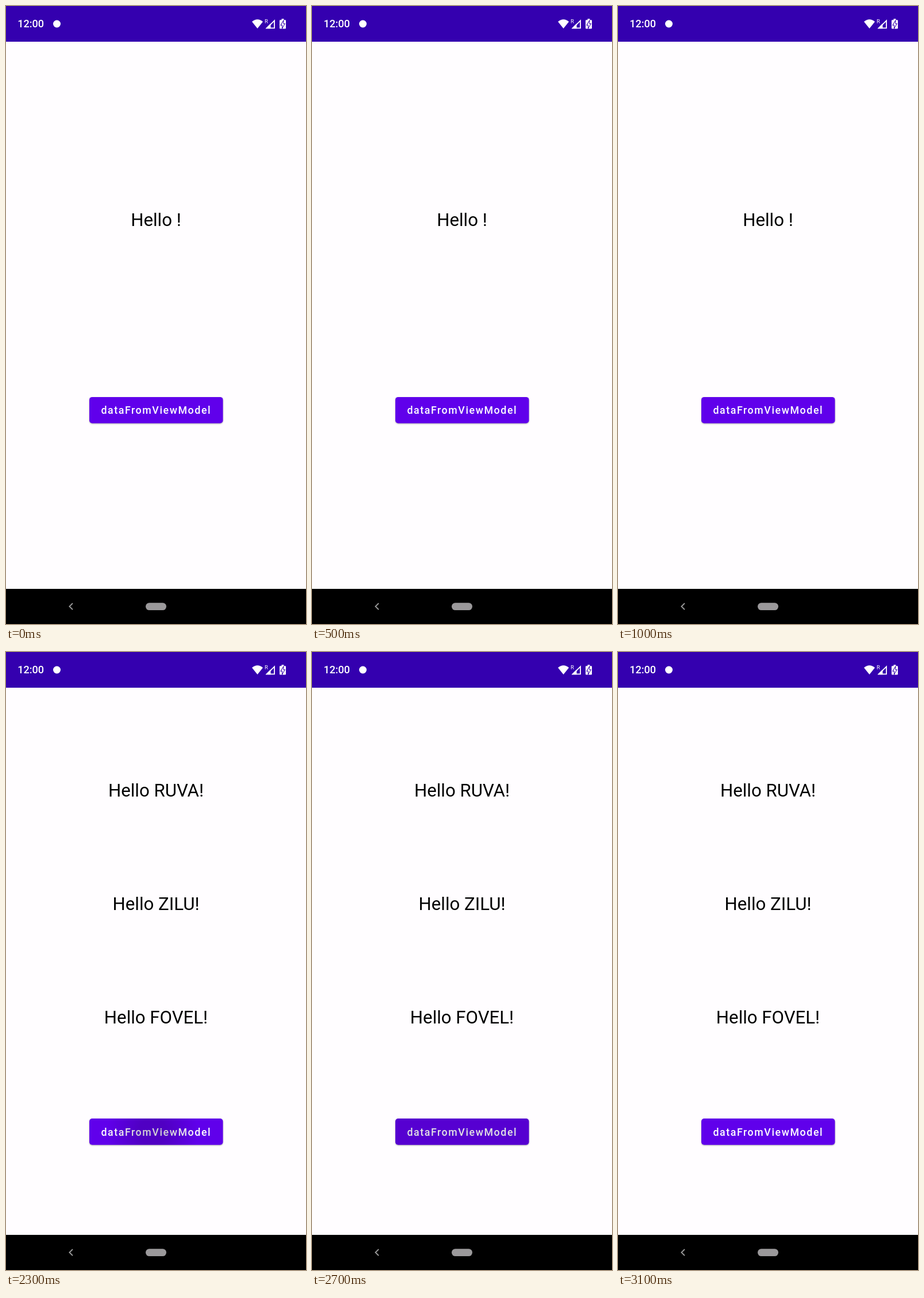
An HTML page that plays this animation: 522 by 1073 pixels, repeating every 4200 ms.

```html
<!DOCTYPE html>
<html lang="en">
<head>
<meta charset="utf-8">
<title>Greeting list</title>
<style>
  html, body { margin: 0; width: 100%; height: 100%; overflow: hidden; background: #fffdff; }
  svg { display: block; width: 522px; height: 1073px; font-family: Roboto, sans-serif; }
  .greeting { font-size: 31.2px; text-anchor: middle; }
  .label { font-size: 17.77px; font-weight: 500; letter-spacing: 1.586px; fill: #fff; }
  .surface { filter: drop-shadow(0 1.3px 1.3px rgba(0, 0, 0, .32)); }
</style>
</head>
<body>
<svg viewBox="0 0 522 1073">
  <defs>
    <radialGradient id="ripple" gradientUnits="userSpaceOnUse" cx="110" cy="23" r="80">
      <stop offset=".3"/>
      <stop offset="1" stop-opacity="0"/>
    </radialGradient>
  </defs>

  <rect width="522" height="1073" fill="#fffdff"/>

  <!-- status bar -->
  <rect width="522" height="62" fill="#3400af"/>
  <g fill="#fff">
    <text x="20.3" y="37.2" font-size="18" font-weight="500">12:00</text>
    <circle cx="88.5" cy="31" r="6.5"/>
    <path d="M428 27.2Q437.5 19.4 447 27.2L437.5 39Z"/>
    <text x="450" y="30" font-size="9.5">R</text>
    <path d="M451.5 39.3L460.5 30.3V39.3Z"/>
    <path d="M454 38.3H467V25.3Z" fill="none" stroke="#fff" stroke-width="1.8"/>
    <path d="M479.5 22.3h4v2h2.2q1.3 0 1.3 1.3v12.6q0 1.3-1.3 1.3h-8.4q-1.3 0-1.3-1.3V25.6q0-1.3 1.3-1.3h2.2z"/>
    <path d="M482.4 26.8L478.8 32.7H481V37.2L484.4 31.2H482.4Z" stroke="#3400af" stroke-width="2" paint-order="stroke"/>
  </g>

  <g id="greetings"></g>

  <g id="button">
    <rect class="surface" width="232.5" height="45.6" rx="5" fill="#6000eb"/>
    <text class="label" x="20.4" y="29.6">dataFromViewModel</text>
    <rect id="overlay" width="232.5" height="45.6" rx="5"/>
  </g>

  <!-- navigation bar -->
  <rect y="1012" width="522" height="61" fill="#000"/>
  <path d="M116 1037L110.4 1042.5L116 1048" fill="none" stroke="#999" stroke-width="1.8"/>
  <rect x="243" y="1036.2" width="36" height="12.8" rx="6.4" fill="#9b999b"/>
</svg>
<script>
  const LOOP = 4200, STEP = 100;
  const PRESS = 2300, FADE_START = 2800, FADE_END = 3100, PRESS_ALPHA = 0.11;
  const byId = id => document.getElementById(id);
  const greetings = byId('greetings'), button = byId('button'), overlay = byId('overlay');
  let shownNames;

  function showNames(names) {
    if (names === shownNames) return;
    shownNames = names;
    const firstY = 448 - names.length * 65.6;
    greetings.innerHTML = names.map((name, i) =>
      `<text class="greeting" x="261" y="${firstY + i * 197}">Hello ${name}!</text>`).join('');
    button.setAttribute('transform', `translate(145 ${613.3 + names.length * 65.6})`);
  }

  const before = [''], after = ['RUVA', 'ZILU', 'FOVEL'];

  function pressAlpha(t) {
    if (t < PRESS) return 0;
    const left = (FADE_END - t) / (FADE_END - FADE_START);
    return PRESS_ALPHA * Math.max(0, Math.min(1, left));
  }

  function render(now) {
    const t = Math.floor((now % LOOP) / STEP) * STEP;
    showNames(t < PRESS ? before : after);
    overlay.setAttribute('fill', t === PRESS ? 'url(#ripple)' : '#000');
    overlay.setAttribute('opacity', t === PRESS ? 0.17 : pressAlpha(t));
  }

  const start = performance.now();
  function tick() {
    render(performance.now() - start);
    requestAnimationFrame(tick);
  }
  tick();
</script>
</body>
</html>
```
